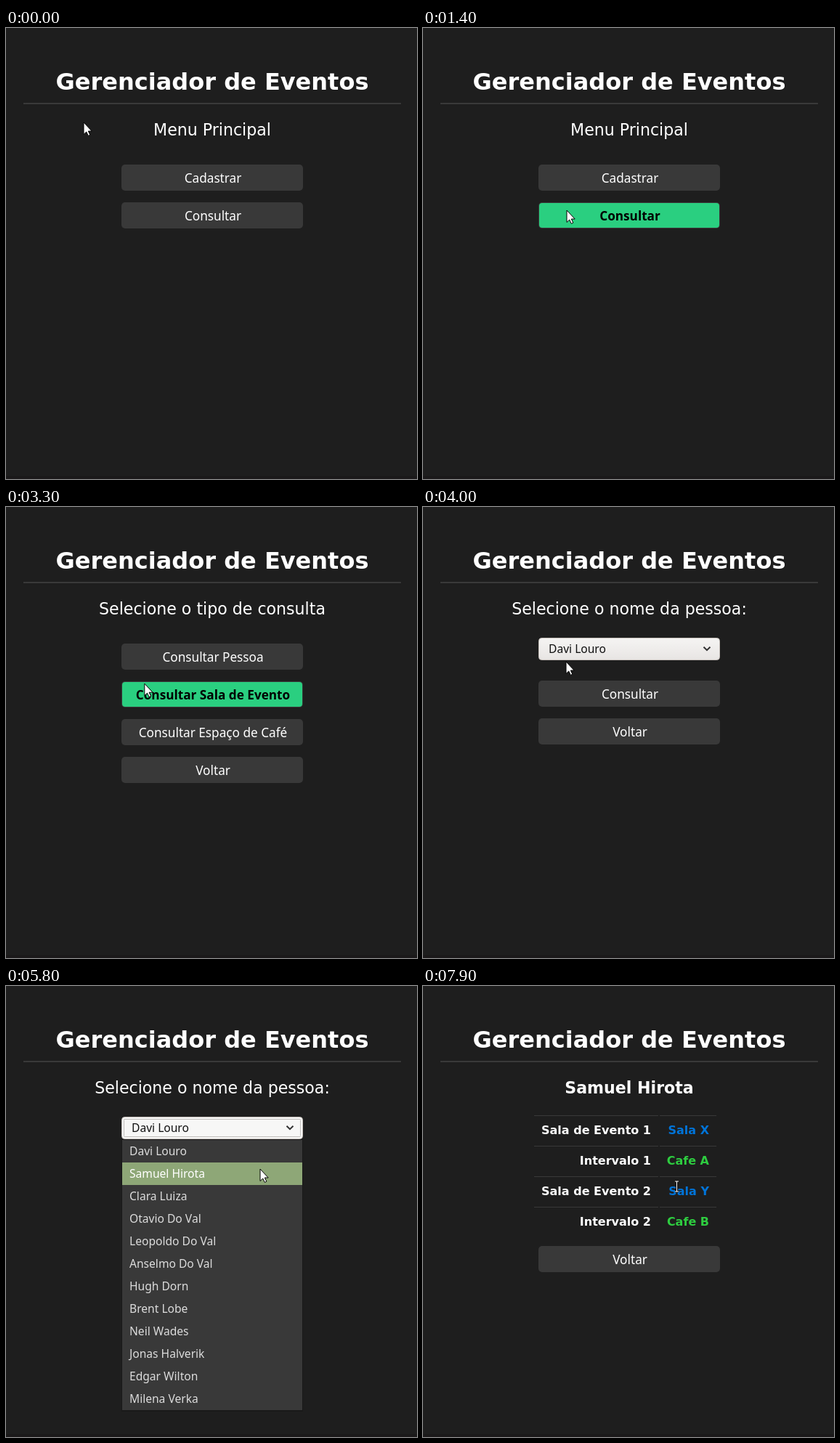
Animation of 566 by 621 pixels, one loop 8000 ms. Source, as an HTML page:

```html
<!DOCTYPE html>
<html lang="pt">
<head>
<meta charset="utf-8">
<title>Gerenciador de Eventos</title>
<style>
  html, body { margin: 0; width: 100%; height: 100%; overflow: hidden; background: #1e1e1e; }
  svg { display: block; width: 566px; height: 621px; }
  text { fill: #fff; white-space: pre; }
  .title { font: bold 32px "DejaVu Sans", sans-serif; text-anchor: middle; }
  .sub { font: 22.1px "DejaVu Sans", sans-serif; text-anchor: middle; }
  .strong { font-weight: bold; }
  .cell { font: bold 16px "DejaVu Sans", sans-serif; text-anchor: end; }
  .label { font: 17.2px "Noto Sans", sans-serif; text-anchor: middle; }
  .item { font: 15.6px "Noto Sans", sans-serif; fill: #dcdcdc; }
  .on .label { font-weight: bold; fill: #000; }
  .on .item { fill: #fff; }
  .face, .row { fill: none; }
  .on .face { fill: #2acf80; }
  .on .row { fill: #8ea777; }
  .value { font: 15.6px "Noto Sans", sans-serif; fill: #111; }
</style>
</head>
<body>
<svg id="stage" viewBox="0 0 566 621">
  <defs>
    <linearGradient id="idle" x2="0" y2="1">
      <stop stop-color="#f5f4f3"/><stop offset="1" stop-color="#e8e5e3"/>
    </linearGradient>
  </defs>
</svg>
<script>
const LOOP = 8000, STEP = 100;
const NAMES = ["Davi Louro", "Samuel Hirota", "Clara Luiza", "Otavio Do Val",
  "Leopoldo Do Val", "Anselmo Do Val", "Hugh Dorn", "Brent Lobe", "Neil Wades",
  "Jonas Halverik", "Edgar Wilton", "Milena Verka"];

// Pointer path: time, x, y
const PATH = [
  [0, 107, 130], [100, 107, 130], [700, 198, 204], [900, 198, 204], [1400, 198, 251],
  [1900, 198, 251], [2400, 139.5, 263], [2500, 133, 266], [2900, 166, 316],
  [3400, 197, 225], [3600, 197, 213], [4000, 197, 213], [4600, 250, 199],
  [5100, 399, 190], [5200, 400, 190], [5500, 370, 222], [5800, 350, 252],
  [6300, 350, 252], [6700, 350, 268], [7500, 350, 268], [7900, 349.5, 276], [8000, 349.5, 276]
];
// Scene start times: menu, query type, person, result
const SCENES = [0, 1900, 3900, 7600];
const PRESS = 5200, OPEN = 5300, PICK = 6300;

const stage = document.getElementById("stage");

function add(parent, tag, attrs = {}, text = "") {
  const el = document.createElementNS("http://www.w3.org/2000/svg", tag);
  for (const key in attrs) el.setAttribute(key, attrs[key]);
  if (text) el.textContent = text;
  parent.append(el);
  return el;
}
const rect = (parent, x, y, width, height, fill, more) =>
  add(parent, "rect", { x, y, width, height, fill, ...more });
const write = (parent, cls, x, y, text) => add(parent, "text", { class: cls, x, y }, text);
const show = (el, on) => el.setAttribute("visibility", on ? "inherit" : "hidden");

const buttons = [];
function button(parent, y, text) {
  const g = add(parent, "g");
  rect(g, 159, y, 250, 36, "#393939", { rx: 5 });
  add(g, "rect", { class: "face", x: 160, y: y + 1, width: 248, height: 34, rx: 4 });
  write(g, "label", 285, y + 25, text);
  buttons.push({ g, y, parent });
}

function scene(heading, cls = "sub") {
  const g = add(stage, "g");
  write(g, cls, 284, 148, heading);
  return g;
}

rect(stage, 0, 0, 566, 621, "#1e1e1e");
rect(stage, 0, 617, 566, 4, "#1b191a");
write(stage, "title", 284, 85, "Gerenciador de Eventos");
rect(stage, 24, 103, 520, 2, "#393939");

const menu = scene("Menu Principal");
["Cadastrar", "Consultar"].forEach((s, i) => button(menu, 188 + 52 * i, s));

const types = scene("Selecione o tipo de consulta");
["Consultar Pessoa", "Consultar Sala de Evento", "Consultar Espaço de Café", "Voltar"]
  .forEach((s, i) => button(types, 188 + 52 * i, s));

const person = scene("Selecione o nome da pessoa:");
button(person, 239, "Consultar");
button(person, 291, "Voltar");
const box = rect(person, 159.5, 180.5, 249, 30, "url(#idle)", { rx: 4, stroke: "#c9c3be" });
const ring = rect(person, 162.5, 183.5, 243, 24, "none",
  { rx: 1, stroke: "#8d8783", "stroke-dasharray": "1 1" });
const value = write(person, "value", 173, 201, NAMES[0]);
add(person, "path", { d: "M386.5 192.7l4.5 4.5 4.5-4.5", fill: "none", stroke: "#333", "stroke-width": 2 });

const list = add(person, "g");
rect(list, 159, 211, 250, 375, "#191919");
rect(list, 160, 212, 248, 372, "#393939");
const rows = NAMES.map((name, i) => {
  const g = add(list, "g"), y = 212 + 31 * i;
  add(g, "rect", { class: "row", x: 160, y, width: 248, height: 31 });
  write(g, "item", 170, y + 21, name);
  return g;
});

const result = scene(NAMES[1], "sub strong");
["Sala de Evento 1|Sala X", "Intervalo 1|Cafe A", "Sala de Evento 2|Sala Y", "Intervalo 2|Cafe B"]
  .forEach((line, i) => {
    const [key, val] = line.split("|"), y = 178 + 42 * i;
    rect(result, 153, y, 171, 1, "#393939");
    rect(result, 326, y, 78, 1, "#393939");
    write(result, "cell", 314, y + 26, key);
    write(result, "cell", 394, y + 26, val).style.fill = i % 2 ? "#2ecc40" : "#0074d9";
  });
button(result, 358, "Voltar");

const scenes = [menu, types, person, result];
const arrow = add(stage, "path", {
  d: "M0 0V16.5L3.7 13 6.3 18.4 8.8 17.2 6.3 12H11.2Z", fill: "#fff", stroke: "#000", "stroke-linejoin": "round"
});
const beam = add(stage, "g", { fill: "none" });
for (const [stroke, width] of [["#111", 3], ["#fff", 1]])
  add(beam, "path", { d: "M-2.5 -7H2.5M0 -7V7M-2.5 7H2.5", stroke, "stroke-width": width });

function pointer(t) {
  const i = PATH.findIndex(p => p[0] > t);
  const [t0, x0, y0] = PATH[i - 1], [t1, x1, y1] = PATH[i];
  const k = (t - t0) / (t1 - t0);
  return [x0 + (x1 - x0) * k, y0 + (y1 - y0) * k];
}

function draw(t) {
  const [x, y] = pointer(t);
  const now = SCENES.filter(s => s <= t).length - 1;
  const open = t >= OPEN && t < PICK;
  const inside = x >= 159 && x < 409;
  scenes.forEach((g, i) => show(g, i === now));

  for (const b of buttons) {
    const over = b.parent === scenes[now] && !open && inside && y >= b.y && y < b.y + 36;
    b.g.classList.toggle("on", over);
  }

  const pressed = t >= PRESS && t < OPEN;
  const hover = inside && y >= 180 && y < 211;
  box.setAttribute("fill", pressed ? "#d6d1cd" : open || hover ? "#f7f7f6" : "url(#idle)");
  show(ring, t >= PRESS);
  value.textContent = NAMES[t < PICK ? 0 : 1];
  show(list, open);
  const active = Math.max(0, Math.floor((y - 212) / 31));
  rows.forEach((g, i) => g.classList.toggle("on", i === active));

  const at = `translate(${x} ${y})`;
  arrow.setAttribute("transform", at);
  beam.setAttribute("transform", at);
  show(arrow, now < 3);
  show(beam, now === 3);
}

let last = -1;
function tick() {
  const t = Math.floor(performance.now() % LOOP / STEP) * STEP;
  if (t !== last) draw(last = t);
  requestAnimationFrame(tick);
}
tick();
</script>
</body>
</html>
```
